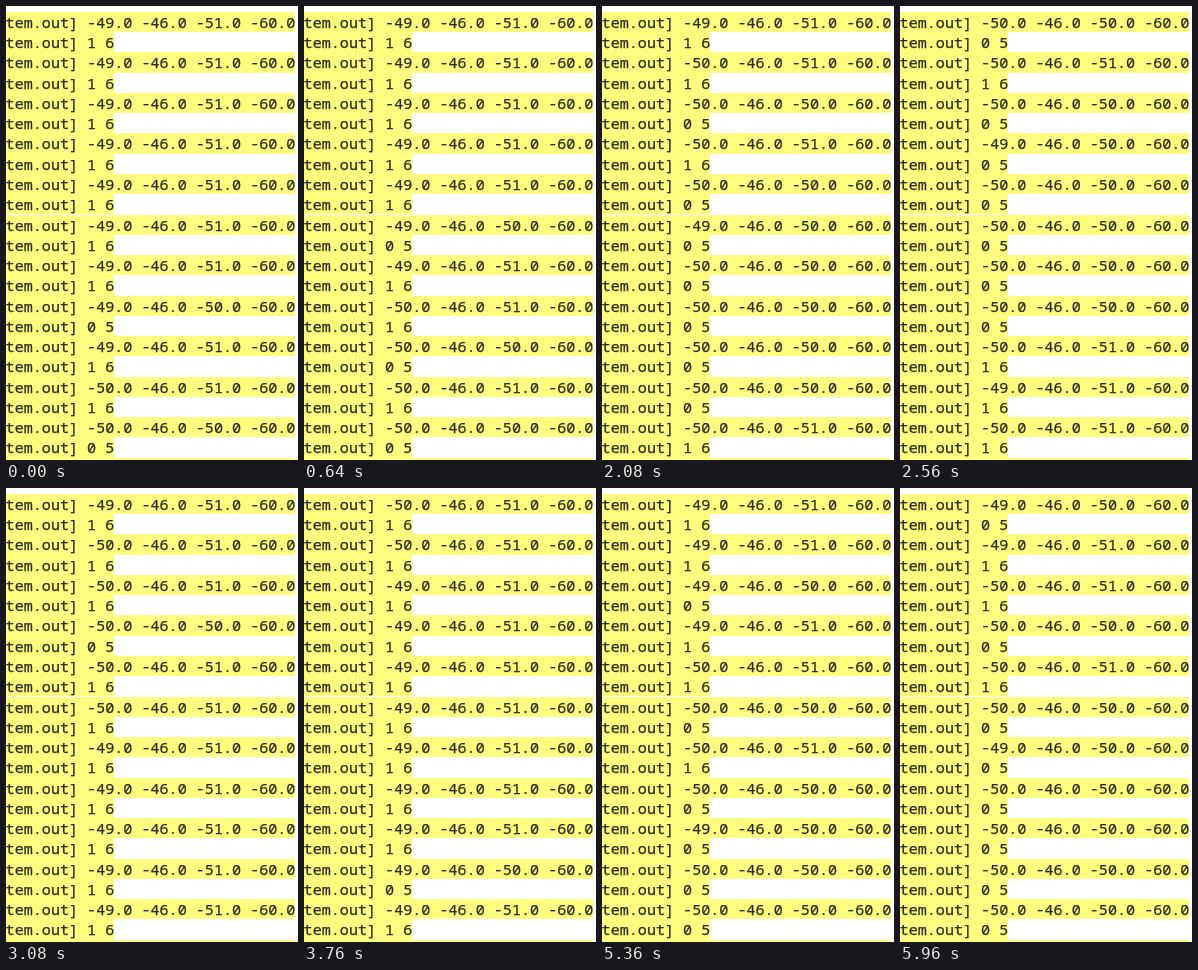
These frames come from a looping animation (292x454 px, 6000 ms). An HTML page:

```html
<!DOCTYPE html>
<html lang="en">
<head>
<meta charset="utf-8">
<title>Console log</title>
<style>
  html, body { margin: 0; width: 100%; height: 100%; overflow: hidden; background: #fff; }
  #log { position: relative; width: 292px; height: 454px; overflow: hidden; }
  .row {
    position: absolute; left: -0.4px; height: 20.27px; white-space: pre;
    font: 15.1px/20.27px "Noto Sans Mono", "DejaVu Sans Mono", monospace;
    color: #2a2a1c; background: #fffd80;
    -webkit-text-stroke: 0.25px #2a2a1c;
  }
</style>
</head>
<body>
<div id="log"></div>
<script>
  const LOOP = 6000, STEP = 40;
  const ROW = 20.27, TOP = 5.8, ROWS = 23;

  // One letter per reading; the log repeats this cycle.
  const CYCLE = "ACCDCCAAAAAAABACDCDBDDDDC", ORIGIN = 6;
  const READINGS = { A: [49, 51], B: [49, 50], C: [50, 51], D: [50, 50] };

  // Scroll runs: start time, first reading on top, ms per reading.
  const RUNS = [
    [0, 0, 250],
    [2636, -7, 224.6]
  ];

  const log = document.getElementById("log");
  const rows = Array.from({ length: ROWS }, (_, i) => {
    const row = document.createElement("div");
    row.className = "row";
    row.style.top = TOP + i * ROW + "px";
    return log.appendChild(row);
  });

  function lineText(pair, isResult) {
    const n = CYCLE.length;
    const [first, third] = READINGS[CYCLE[((pair + ORIGIN) % n + n) % n]];
    const text = isResult
      ? (third === 51 ? "1 6" : "0 5")
      : `-${first}.0 -46.0 -${third}.0 -60.0`;
    return "tem.out] " + text;
  }

  function topReading(t) {
    const [start, from, every] = RUNS.filter(run => run[0] <= t).pop();
    return from + Math.floor((t - start) / every);
  }

  let shown = null;
  function draw(time) {
    const t = Math.floor(time / STEP + 0.02) * STEP % LOOP;
    const top = topReading(t);
    if (top === shown) return;
    shown = top;
    rows.forEach((row, i) => {
      row.textContent = lineText(top + Math.floor(i / 2), i % 2 === 1);
    });
  }

  const begin = performance.now();
  function tick() {
    draw((performance.now() - begin) % LOOP);
    requestAnimationFrame(tick);
  }
  draw(0);
  requestAnimationFrame(tick);
</script>
</body>
</html>
```
